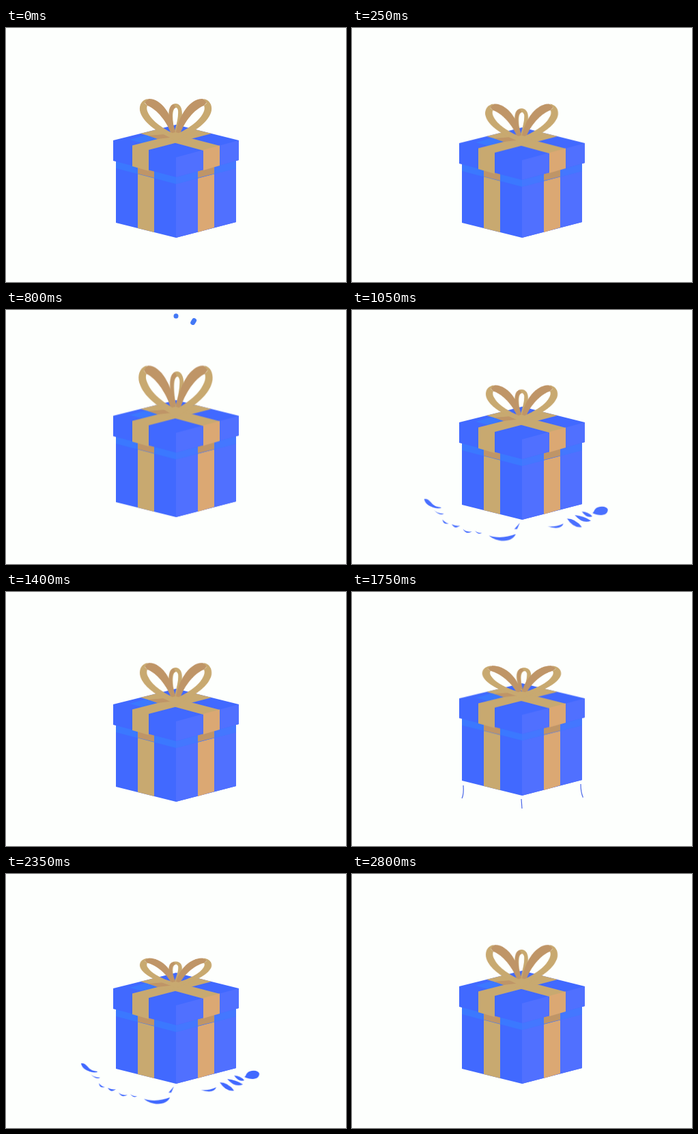
An HTML page without scripts that plays this animation: 498 by 373 pixels, repeating every 2.85 s.

```html
<!DOCTYPE html>
<html lang="en">
<head>
<meta charset="utf-8">
<title>Jumping gift</title>
<style>
  html, body { margin: 0; width: 100%; height: 100%; overflow: hidden; background: #fdfffd; }
  svg { display: block; width: 100%; height: 100%; }

  .left { fill: #4169ff; }
  .right { fill: #5070ff; }
  .tan { fill: #c8a970; }
  .peach { fill: #dba873; }
  .dark { fill: #bf9567; }
  .shade { fill: #3b78ff; }
  .shade-r { fill: #4477ff; }

  .body, .lid, .bow, .mid, .trails, .splash, .spark { animation: 2850ms linear infinite; }
  .body { animation-name: jump; }
  .lid { animation-name: lid; transform-origin: 249px 219px; }
  .bow { animation-name: bow; transform-origin: 249px 160px; }
  .mid { animation-name: sway; transform-origin: 249px 160px; }
  .trails { animation-name: trail; fill: none; stroke: #4a67e8; stroke-width: 1.2; }
  .splash { animation-name: splash; transform-origin: 249px 295px; fill: #4169ff; }
  .spark { animation-name: spark; fill: none; stroke: #4076f5; stroke-width: 7; stroke-linecap: round; }

  /* Each jump is listed twice, 1350 ms apart. */
  @keyframes jump {
    0%, 100% { transform: translateY(0); }
    13%, 60.37% { transform: translateY(0); animation-timing-function: cubic-bezier(.333, .667, .667, 1); }
    21.05%, 68.42% { transform: translateY(-36.5px); animation-timing-function: cubic-bezier(.333, 0, .667, .333); }
    28.51%, 75.88% { transform: translateY(0); }
  }
  @keyframes lid {
    0%, 7.02%, 43.86%, 54.39%, 91.23%, 100% { transform: translateY(0) scaleY(1); }
    10.53%, 57.89% { transform: translateY(8px) scaleY(1); }
    13.16%, 60.53% { transform: translateY(-2px) scaleY(.965); }
    15.79%, 63.16% { transform: translateY(-27px) scaleY(.965); animation-timing-function: cubic-bezier(.333, .667, .667, 1); }
    21.05%, 68.42% { transform: translateY(-58px) scaleY(1); }
    22.81%, 70.18% { transform: translateY(-56px) scaleY(1); animation-timing-function: cubic-bezier(.333, .2, .667, .5); }
    28.07%, 75.44% { transform: translateY(-10px) scaleY(1); }
    29.82%, 77.19% { transform: translateY(7px) scaleY(1); }
    31.58%, 78.95% { transform: translateY(8px) scaleY(1); }
    35.09%, 82.46% { transform: translateY(3px) scaleY(1); }
    38.6%, 85.96% { transform: translateY(-3px) scaleY(1); }
  }
  @keyframes bow {
    0%, 7.02%, 43.86%, 54.39%, 91.23%, 100% { transform: none; }
    10.53%, 57.89% { transform: scale(1.03, .88); }
    15.79%, 63.16% { transform: scale(1.13, .76); }
    19.3%, 66.67% { transform: scale(1.16, .97); }
    22.81%, 70.18% { transform: scale(1.2, 1.18); }
    28.07%, 75.44% { transform: scale(1.03, 1.23); }
    31.58%, 78.95% { transform: scale(1, .82); }
    35.09%, 82.46% { transform: scale(1, .7); }
    38.6%, 85.96% { transform: scale(1, 1.06); }
  }
  @keyframes sway {
    0%, 10.53%, 31.58%, 57.89%, 78.95%, 100% { transform: translateX(0) scaleY(1); }
    15.79%, 22.81%, 63.16%, 70.18% { transform: translateX(5px) scaleY(1.1); }
    28.07%, 75.44% { transform: translateX(2px) scaleY(1); }
  }
  @keyframes trail {
    0%, 13.3%, 24.5%, 60.7%, 71.9%, 100% { opacity: 0; stroke-dasharray: 20 0 0 20; }
    14.04%, 15.79%, 61.4%, 63.16% { opacity: 1; stroke-dasharray: 20 0 0 20; }
    22.81%, 70.18% { opacity: .5; stroke-dasharray: 5 3 3 20; }
  }
  @keyframes splash {
    0%, 29.4%, 41%, 76.8%, 88.4%, 100% { opacity: 0; transform: scale(.8, .6); }
    29.82%, 77.19% { opacity: 1; transform: scale(.85, .63); animation-timing-function: ease-out; }
    35.09%, 82.46% { opacity: 1; transform: none; }
    38.6%, 85.96% { opacity: .9; transform: scale(1.06); }
    40.9%, 88.3% { opacity: 0; transform: scale(1.08); }
  }
  @keyframes spark {
    0%, 17.5%, 30.8%, 64.8%, 78.2%, 100% { opacity: 0; stroke-dasharray: 0 200; stroke-dashoffset: 0; }
    17.54%, 64.91% { opacity: 1; stroke-dasharray: 0 200; stroke-dashoffset: 0; animation-timing-function: ease-out; }
    22.81%, 70.18% { opacity: 1; stroke-dasharray: var(--len) 200; stroke-dashoffset: var(--at); }
    26.32%, 73.68% { opacity: 1; }
    28.07%, 75.44% { opacity: var(--last); stroke-dasharray: var(--tip) 200; stroke-dashoffset: var(--end); }
    30.7%, 78.1% { opacity: 0; stroke-dasharray: 0 200; stroke-dashoffset: -100; }
  }
</style>
</head>
<body>
<svg viewBox="0 0 498 373" preserveAspectRatio="none">
  <defs>
    <g id="loop">
      <path class="dark" d="M209 104C226 103 244 126 249 158L242 156C236 138 221 119 207 114L202 108Z"/>
      <path class="tan" d="M208 104C199 105 195 113 196 121C199 138 222 153 241 161L249 157C233 149 213 138 207 122C206 119 206 116 207 114L203 110Z"/>
    </g>
  </defs>

  <g class="splash">
    <path d="M110 278C118 277 119 285 126 288C131 290 134 289 134 291C127 293 111 288 110 278Z"/>
    <path d="M123 293Q128 299 138 299Q132 303 123 293ZM136 307Q140 312 145 313Q137 315 136 307ZM149 314Q155 317 161 316Q154 322 149 314ZM165 321Q171 326 178 324Q170 330 165 321ZM182 323Q186 327 192 326Q187 330 182 323Z"/>
    <path d="M202 330C213 334 228 333 240 328C236 340 214 341 202 330Z"/>
    <path d="M238 321L246 312L242 321Z"/>
    <path d="M371 293C371 302 360 303 349 298C352 297 351 290 360 289Q369 288 371 293Z"/>
    <path d="M334 296Q343 296 349 303Q341 306 334 296ZM324 301Q337 302 347 309Q335 314 324 301ZM313 306Q325 306 334 318Q322 320 313 306ZM285 317Q297 318 308 313Q304 323 285 317Z"/>
  </g>

  <g class="body">
    <path class="left" d="M161 172H337V285L249 308L161 286Z"/>
    <path class="right" d="M337 172H249V308L337 285Z"/>
    <path class="tan" d="M193 180L217 187V300L193 294Z"/>
    <path class="peach" d="M305 180L281 187V300L305 293Z"/>
    <path class="trails" d="M163 293Q164 306 161 312M248 313L249 327M335 291Q335 304 339 312"/>
  </g>

  <g class="lid">
    <path class="shade" d="M161 190H337V206L249 229L161 206Z"/>
    <path class="shade-r" d="M337 190H249V229L337 206Z"/>
    <path class="dark" d="M193 198L217 204V220L193 214ZM305 198L281 204V220L305 214Z"/>

    <path class="left" d="M157 165L249 142L341 165V194L249 219L157 195Z"/>
    <path class="right" d="M341 165L249 190V219L341 194Z"/>
    <path class="shade" d="M181 164L205 157L224 162L200 169Z"/>
    <path class="tan" d="M185 172.6L277 149L301 155L209 179.1V210L185 203Z"/>
    <path class="tan" d="M313 173L221 149L197 155L289 180Z"/>
    <path class="dark" d="M208 158L246 155L248 160L222 163Z"/>
    <path class="peach" d="M313 172.6L289 179.1V209L313 202Z"/>

    <g class="bow">
      <g class="mid">
        <path class="tan" fill-rule="evenodd" d="M248 111C258 111 260 124 256 140L251 158L243 150C237 134 235 112 248 111ZM249 117C243 118 243 134 247 151Q253 132 252 121Q251 117 249 117Z"/>
        <path class="dark" d="M246 112C238 113 237 128 242 146L247 152C243 134 241 119 248 117Z"/>
      </g>
      <use href="#loop"/>
      <use href="#loop" transform="matrix(-1 0 0 1 497 0)"/>
      <path class="tan" d="M234 157L248 153L264 157L249 166Z"/>
    </g>
  </g>

  <path class="spark" pathLength="100" d="M235 38L217 7" style="--len:42;--at:-29;--tip:0;--end:-97;--last:0"/>
  <path class="spark" pathLength="100" d="M249 40V8" style="--len:34;--at:-49;--tip:1;--end:-97;--last:1"/>
  <path class="spark" pathLength="100" d="M262 38L277 13" style="--len:18;--at:-40;--tip:12;--end:-78;--last:1"/>
</svg>
</body>
</html>
```
